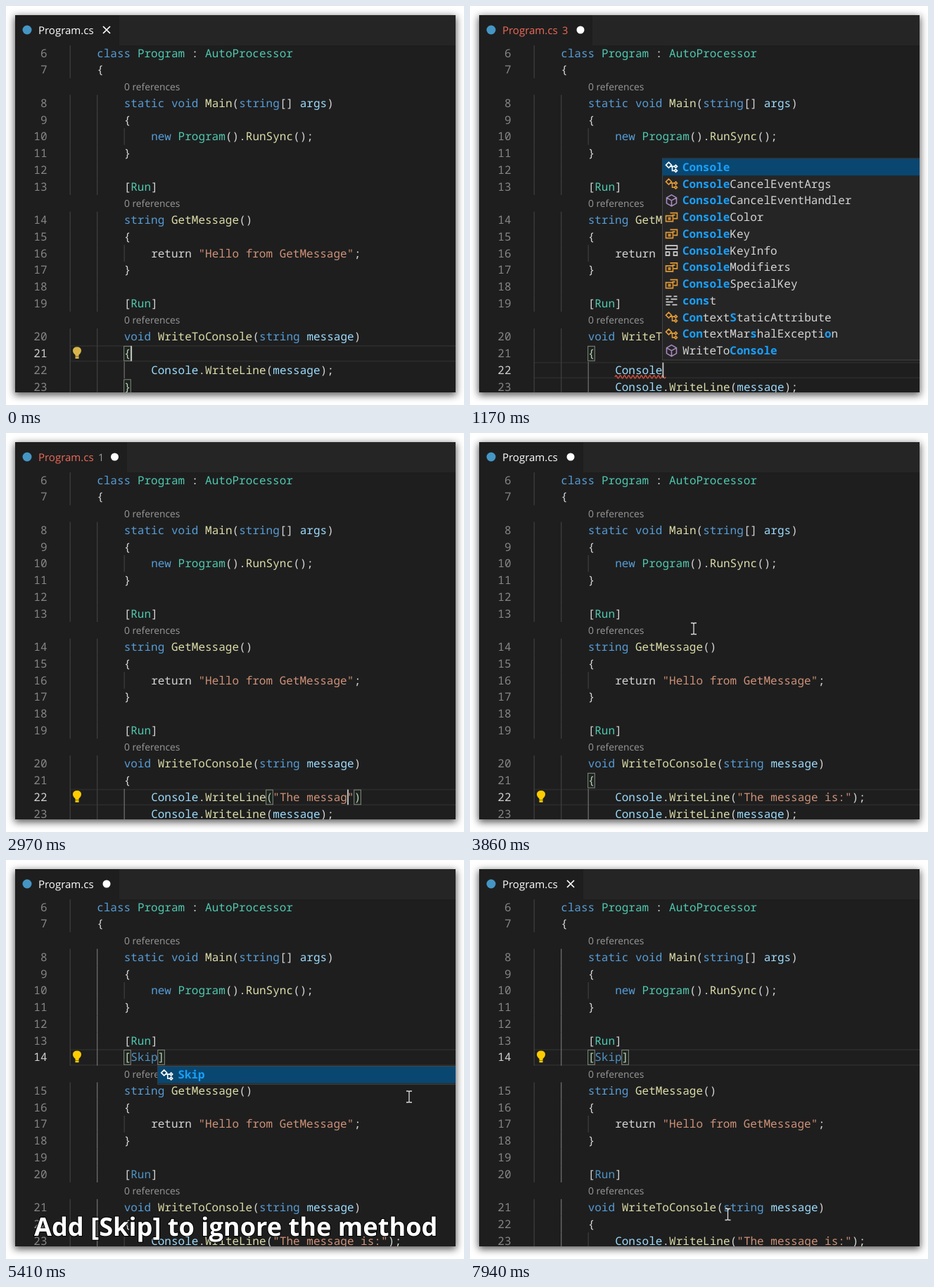
An HTML page for the animation above (8000 ms loop, 651 by 568 pixels).

```html
<!DOCTYPE html>
<html lang="en">
<head>
<meta charset="utf-8">
<title>Code editor</title>
<style>
  html, body { margin: 0; width: 100%; height: 100%; overflow: hidden; background: #fff; }
  .window { position: absolute; left: 13px; top: 13px; width: 626px; height: 537px;
    background: #1e1e1e; box-shadow: 0 3px 10px 1px rgba(0, 0, 0, .65); }
  svg { position: absolute; left: 0; top: 0; }
  text { white-space: pre; text-rendering: geometricPrecision; }
  .code { font: 500 16px "Noto Sans Mono", monospace; fill: #d4d4d4; }
  .ui { font-family: "Open Sans", sans-serif; }
  .caption { font: bold 36.2px "Open Sans", sans-serif; fill: #fff; stroke: #000; stroke-width: 2; paint-order: stroke; }
</style>
</head>
<body>
<div class="window"></div>
<svg width="651" height="568" viewBox="0 0 651 568">
  <clipPath id="frame"><rect x="13" y="13" width="626" height="537"/></clipPath>
  <g id="scene" clip-path="url(#frame)"></g>
</svg>
<script>
const LOOP = 8000, CHAR = 9.62, LINE = 23.75, LEFT = 90.7, FIRST = 67.2;
const colX = col => LEFT + col * CHAR;
const rowY = row => FIRST + row * LINE;
const rowTop = row => rowY(row) - LINE / 2;

const rect = (x, y, w, h, fill, extra = '') =>
  `<rect x="${x}" y="${y}" width="${w}" height="${h}" fill="${fill}" ${extra}/>`;
const line = (x1, y1, x2, y2, color, w = 1.2) =>
  `<path d="M${x1} ${y1}L${x2} ${y2}" stroke="${color}" stroke-width="${w}"/>`;
const escapeText = s => s.replace(/&/g, '&amp;').replace(/</g, '&lt;');
const ui = (x, y, size, fill, s) =>
  `<text class="ui" x="${x}" y="${y}" font-size="${size}" fill="${fill}">${s}</text>`;

// Syntax colouring
const KEYWORDS = /^(class|static|void|string|new)$/;
const TYPES = /^(Program|AutoProcessor|Run)$/;
function tokenColor(token, before, after, blueRun) {
  if (token[0] === '"') return '#ce9178';
  if (!/\w/.test(token) || token === 'return') return '#d4d4d4';
  if (/^Ski?p?$|^S$/.test(token) || (blueRun && token === 'Run')) return '#4e94c4';
  if (KEYWORDS.test(token)) return '#569cd6';
  if (TYPES.test(token)) return '#4ec9b0';
  if (after === '(' || before === '.') return '#dcdcaa';
  return '#9cdcfe';
}
function codeText(source, y, blueRun) {
  const spans = [...source.matchAll(/"[^"]*"?|\w+|[^\w\s"]+/g)].map(({ 0: token, index }) => {
    const color = tokenColor(token, source[index - 1], source[index + token.length], blueRun);
    return `<tspan x="${colX(index)}" fill="${color}">${escapeText(token)}</tspan>`;
  });
  return `<text class="code" y="${y + 5.5}">${spans.join('')}</text>`;
}

// Document: null stands for a reference hint above a member
const indent = (n, s) => ' '.repeat(n) + s;
function documentRows({ typed, skip }) {
  const rows = [
    indent(4, 'class Program : AutoProcessor'), indent(4, '{'), null,
    indent(8, 'static void Main(string[] args)'), indent(8, '{'),
    indent(12, 'new Program().RunSync();'), indent(8, '}'), '', indent(8, '[Run]')];
  if (skip !== null) rows.push(indent(8, skip));
  rows.push(null, indent(8, 'string GetMessage()'), indent(8, '{'),
    indent(12, 'return "Hello from GetMessage";'), indent(8, '}'), '', indent(8, '[Run]'), null,
    indent(8, 'void WriteToConsole(string message)'), indent(8, '{'));
  if (typed !== null) rows.push(indent(12, typed));
  rows.push(indent(12, 'Console.WriteLine(message);'), indent(8, '}'));
  return rows.slice(0, 21);
}

// Timeline: each step changes some of the state
const steps = [[0, {
  typed: null, skip: null, row: 18, caret: 9, caretOn: true, boxes: [[18, 8], [20, 8]], bulb: '#d9b44a',
  dirty: false, errors: '', squiggle: false, popup: null, guide: 8, panel: false, output: false }]];
const at = (t, change) => steps.push([t, change]);
function typeCode(t, gap, head, text, tail = '', extra = {}) {
  [...text].forEach((_, i) => {
    const before = head + text.slice(0, i + 1), whole = before + tail;
    const boxes = tail ? [[19, 29], [19, 11 + whole.length]] : [[18, 8]];
    at(t + i * gap, { typed: whole, caret: 12 + before.length, boxes, ...extra });
  });
}
const CALL = 'Console.WriteLine';
at(190, { typed: '', row: 19, caret: 12, boxes: [[18, 8]], bulb: null, dirty: true });
typeCode(390, 110, '', 'Cons', '', { popup: 'types' });
at(650, { errors: '3', squiggle: true });
typeCode(920, 95, 'Cons', 'ole', '', { popup: 'types' });
typeCode(1200, 50, 'Console', '.WriteLine', '', { popup: null });
at(1690, { bulb: '#ffcc00', squiggle: false });
typeCode(1900, 1, CALL, '(', ')', { errors: '1' });
typeCode(2120, 1, CALL + '(', '"', '")');
typeCode(2250, 80, CALL + '("', 'The ', '")');
typeCode(2580, 70, CALL + '("The ', 'message is:', '")');
typeCode(3400, 1, CALL + '("The message is:")', ';');
at(3530, { errors: '' });
at(3800, { caretOn: false });
at(4140, { row: 8, caret: 13, caretOn: true, boxes: [[1, 4]], bulb: null, guide: 4 });
at(4460, { skip: '', row: 9, caret: 8 });
at(4730, { skip: '[]', caret: 9, boxes: [[9, 8], [9, 9]], bulb: '#ffcc00' });
[...'Skip'].forEach((_, i) => at(5070 + i * 66, {
  skip: `[${'Skip'.slice(0, i + 1)}]`, caret: 10 + i, caretOn: false,
  boxes: [[9, 8], [9, 10 + i]], popup: 'skip' }));
at(5540, { popup: null });
at(5680, { dirty: false });
at(5880, { panel: true });
at(5940, { output: true });
at(6660, { panel: false });
steps.sort((a, b) => a[0] - b[0]);
const stateAt = t => Object.assign({}, ...steps.filter(s => s[0] <= t).map(s => s[1]));

// Pointer path: time, x, y
const POINTER = [[3530, 628, 400], [3860, 318, 278.5], [4090, 226, 259], [4300, 226, 259],
  [4660, 573, 337], [6660, 573, 337], [7060, 585, 290], [7400, 510, 272],
  [7470, 500, 279], [7760, 232, 522], [7940, 366.5, 504.5], [8000, 366.5, 504.5]];
function pointer(t) {
  const i = POINTER.findIndex(p => p[0] > t);
  if (i < 1) return '';
  const [a, b] = [POINTER[i - 1], POINTER[i]];
  const u = (t - a[0]) / (b[0] - a[0]), k = u * u * (3 - 2 * u);
  const x = a[1] + (b[1] - a[1]) * k, y = a[2] + (b[2] - a[2]) * k;
  return `<path transform="translate(${x.toFixed(1)} ${y.toFixed(1)})" fill="none" stroke="#ddd" stroke-width="1.3"
    d="M-4 -8h3l1 1 1-1h3M0 -7V7M-4 8h3l1-1 1 1h3"/>`;
}

// Completion list
const ICONS = {
  type: ['#e09a35', 'M-8 -3l4-4 4 4-4 4zM-2 -1h6M1 -1v6h3M4 -1l2-2 2 2-2 2zM4 5l2-2 2 2-2 2z'],
  cube: ['#a98bc0', 'M0 -8l7 4v8l-7 4-7-4v-8zM-7 -4l7 4 7-4M0 0v8'],
  enum: ['#e09a35', 'M-2 -6h10v8h-5M-8 -2h10v8h-10zM-5 1h4M-5 3h4M1 -3h4'],
  struct: ['#d0d0d0', 'M-8 -7h16v5h-16zM-8 2h5v5h-5zM3 2h5v5h-5z'],
  word: ['#d0d0d0', 'M-8 -6h8M3 -6h5M-8 -2h4M-1 -2h9M-8 2h10M-8 6h6M1 6h7'],
};
const LISTS = {
  types: [['type', 'Console'], ['type', 'ConsoleCancelEventArgs'], ['cube', 'ConsoleCancelEventHandler'],
    ['enum', 'ConsoleColor'], ['enum', 'ConsoleKey'], ['struct', 'ConsoleKeyInfo'],
    ['enum', 'ConsoleModifiers'], ['enum', 'ConsoleSpecialKey'], ['word', 'const'],
    ['type', 'ContextStaticAttribute'], ['type', 'ContextMarshalException'], ['cube', 'WriteToConsole']],
  skip: [['type', 'Skip']],
};
function matchedText(label, query, x, y) {
  let hit = 0;
  const spans = [...label].map((c, i) => {
    const match = hit < query.length && c.toLowerCase() === query[hit].toLowerCase();
    if (match) hit++;
    return `<tspan x="${x + i * CHAR}"${match ? ' fill="#18a0fb" font-weight="bold"' : ''}>${c}</tspan>`;
  });
  return `<text class="code" y="${y + 5.5}">${spans.join('')}</text>`;
}
function popup(s) {
  if (!s.popup) return '';
  const items = LISTS[s.popup], x = colX(s.caret), width = 640 - x;
  const query = s.popup === 'types' ? s.typed : s.skip.slice(1, -1);
  const top = s.popup === 'types' ? 217.5 : 294, height = items.length * LINE;
  const rows = items.map(([kind, label], i) => {
    const y = top + (i + .5) * LINE, [color, d] = ICONS[kind];
    return `<path transform="translate(${x + 13} ${y})" d="${d}" fill="none" stroke="${i ? color : '#fff'}" stroke-width="1.6"/>` +
      matchedText(label, query, x + 28.5, y);
  });
  return rect(x, top - .5, width + 2, height + 2, '#252526', 'stroke="#454545"') +
    rect(x, top, width, LINE, '#094771') + rows.join('');
}

// Editor parts
function tab({ dirty, errors }) {
  const right = errors ? (errors === '3' ? 174 : 172) : 161;
  const dotX = errors ? (errors === '3' ? 157 : 154.5) : 143;
  return rect(12, 12, 627, 44, '#252526') + rect(12, 12, right - 12, 44, '#1e1e1e') +
    '<circle cx="30" cy="34" r="6.5" fill="#4596c4"/>' +
    ui(46, 40, 15, errors ? '#ee6a58' : '#fff', 'Program.cs') +
    (errors ? ui(131, 39.5, 14.5, errors === '3' ? '#ee6a58' : '#a09a98', errors) : '') +
    (dirty ? `<circle cx="${dotX}" cy="34" r="5.5" fill="#fff"/>`
      : '<path d="M138 29l10 10M148 29l-10 10" stroke="#fff" stroke-width="1.7"/>');
}
function guides(source, row, active) {
  const depth = source ? source.search(/\S|$/) : 8;
  let out = '';
  for (let col = 0; col < depth; col += 4) {
    const bright = col === active && (col === 4 || row > 17);
    out += line(colX(col) + .5, rowTop(row), colX(col) + .5, rowTop(row + 1), bright ? '#747474' : '#404040');
  }
  return out;
}
function bulb(color, row) {
  const y = rowY(row) - 1;
  return `<path d="M98.5 ${y + 3}C93 ${y - 1} 94 ${y - 8.5} 101 ${y - 8.5}S109 ${y - 1} 103.5 ${y + 3}V${y + 5}H98.5z" fill="${color}"/>` +
    rect(98.5, y + 5.5, 5, 2.8, color);
}
function squiggle(s) {
  let d = `M${colX(12)} 528`;
  for (let i = 0; i < s.typed.length * 1.6; i++) d += 'q1.5 -4 3 0t3 0';
  return `<path d="${d}" fill="none" stroke="#e0523c" stroke-width="1.3"/>`;
}
function editor(s) {
  const top = rowTop(s.row);
  let out = line(LEFT, top + 1, 639, top + 1, '#2b2b2b', 1.8) +
    line(LEFT, top + LINE - 1, 639, top + LINE - 1, '#2b2b2b', 1.8);
  let number = 6;
  documentRows(s).forEach((source, row) => {
    const y = rowY(row);
    if (source === null) {
      out += ui(168, y + 5, 13.8, '#999', '0 references');
      return;
    }
    out += guides(source, row, s.guide);
    out += `<text class="code" x="58.5" y="${y + 5.5}" text-anchor="end" style="fill:${row === s.row ? '#d0d0d0' : '#858585'}">${number++}</text>`;
    out += codeText(source, y, s.skip !== null && row > 9);
  });
  for (const [row, col] of s.boxes)
    out += rect(colX(col), rowTop(row) + 1.5, CHAR, LINE - 3, 'rgba(0,100,0,.1)', 'stroke="#888"');
  if (s.squiggle) out += squiggle(s);
  if (s.bulb) out += bulb(s.bulb, s.row);
  if (s.caretOn) out += rect(colX(s.caret), rowTop(s.row) + 1, 1.8, LINE - 2, '#c8c8c8');
  return out;
}
function panel({ output }) {
  return rect(12, 370, 627, 180, '#1e1e1e') + line(12, 370.5, 639, 370.5, '#444', 1.4) +
    ui(33, 398.5, 13, '#929292', 'PROBLEMS') + ui(130, 398.5, 13, '#e7e7e7', 'DEBUG CONSOLE') +
    line(127, 411.5, 239, 411.5, '#e7e7e7', 1.4) +
    [271, 277.5, 284].map(x => `<circle cx="${x}" cy="393" r="1.5" fill="#c5c5c5"/>`).join('') +
    rect(368, 378, 271, 29.5, '#3c3c3c') + ui(374, 398.5, 14.5, '#b8b8b8', '!---------') +
    rect(611, 381, 28, 23.5, '#4d4d4d') + ui(620, 399, 15, '#f0f0f0', 'Sh') +
    (output ? '<text class="code" x="43" y="431.5" style="fill:#62aaf0;font-weight:600">The message is:</text>' : '');
}
const clamp = v => Math.max(0, Math.min(1, v));
function caption(t) {
  const opacity = Math.min(clamp((t - 4330) / 260), clamp((5810 - t) / 200));
  return opacity ? `<text class="caption" x="40" y="535" opacity="${opacity.toFixed(2)}">Add [Skip] to ignore the method</text>` : '';
}

const scene = document.getElementById('scene');
const start = performance.now();
let shown = '';
function draw() {
  const t = (performance.now() - start) % LOOP, s = stateAt(t);
  const markup = editor(s) + tab(s) + popup(s) + (s.panel ? panel(s) : '') + pointer(t) + caption(t);
  if (markup !== shown) scene.innerHTML = shown = markup;
  requestAnimationFrame(draw);
}
draw();
</script>
</body>
</html>
```
